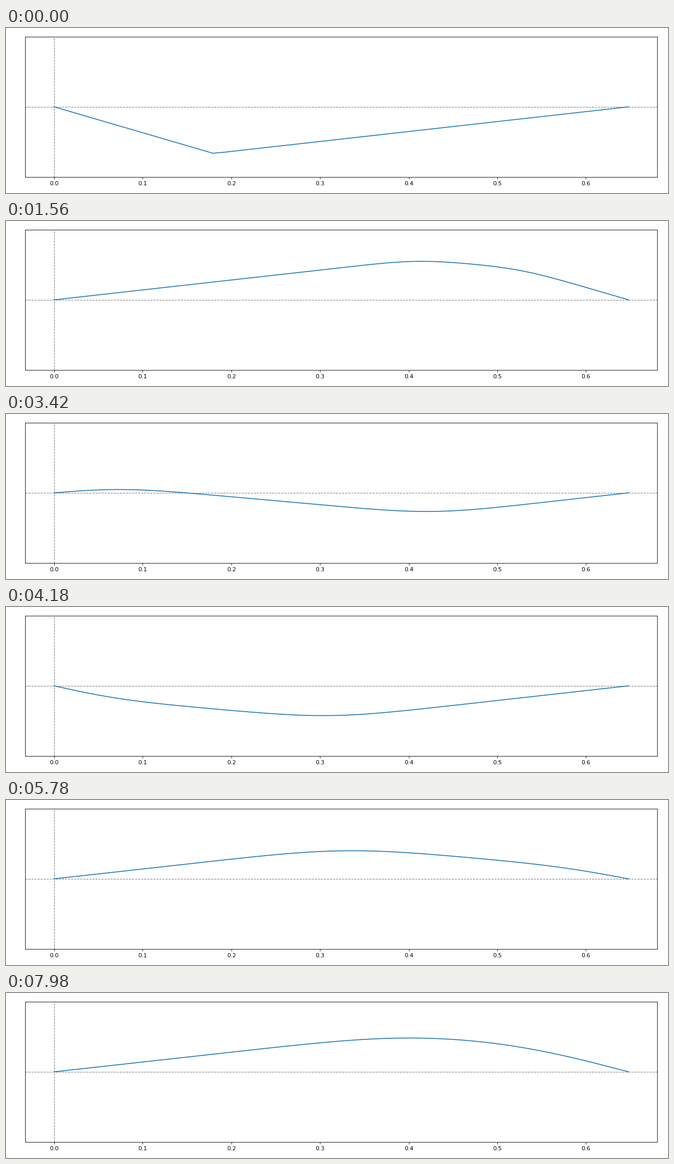
A matplotlib script that plays this animation: 1280x320 px, repeating every 8 s.

```python
import numpy as np
import matplotlib.pyplot as plt
from matplotlib.animation import FuncAnimation

W, H, DPI = 1280, 320, 80
FRAMES, INTERVAL = 400, 20

LENGTH = 0.648      # string length
PERIOD = 53.6       # frames per oscillation
LOSS = 2.5e-5       # damping per frame, all modes
DIFFUSION = 1.52e-4 # extra damping per frame, times mode number squared
MODES = 600

# Plucked shape: straight pieces between these points
px = np.array([0, 0.179, 0.1895, LENGTH])
py = np.array([0, -0.992, -0.9754, 0])

n = np.arange(1, MODES + 1)
k = n * np.pi / LENGTH
bends = -np.diff(np.diff(py) / np.diff(px))
coef = 2 / (LENGTH * k**2) * (np.sin(np.outer(k, px[1:-1])) @ bends)

x = np.union1d(np.linspace(0, LENGTH, 601), px)
shapes = np.sin(np.outer(x, k)) * coef


def string(frame):
    decay = np.exp(-(LOSS + DIFFUSION * n**2) * frame)
    return shapes @ (decay * np.cos(2 * np.pi * n * frame / PERIOD))


fig = plt.figure(figsize=(W / DPI, H / DPI), dpi=DPI, facecolor="white")
left, right, bottom, top = 37.4, 1259.3, 31.0, 303.2
ax = fig.add_axes([left / W, bottom / H, (right - left) / W, (top - bottom) / H])
ax.set_xlim(-0.05 * LENGTH, 1.05 * LENGTH)
ax.set_ylim(-1.5, 1.5)
ax.set_xticks(np.arange(7) / 10)
ax.set_yticks([])

guide = dict(color="gray", linestyle="--", linewidth=1, zorder=1)
ax.axhline(0, **guide)
ax.axvline(0, **guide)
line, = ax.plot(x, string(0), color="C0", linewidth=1.5)


def update(frame):
    line.set_ydata(string(frame))
    return line,


anim = FuncAnimation(fig, update, frames=FRAMES, interval=INTERVAL,
                     repeat=True, repeat_delay=0, blit=False)
plt.show()
```
